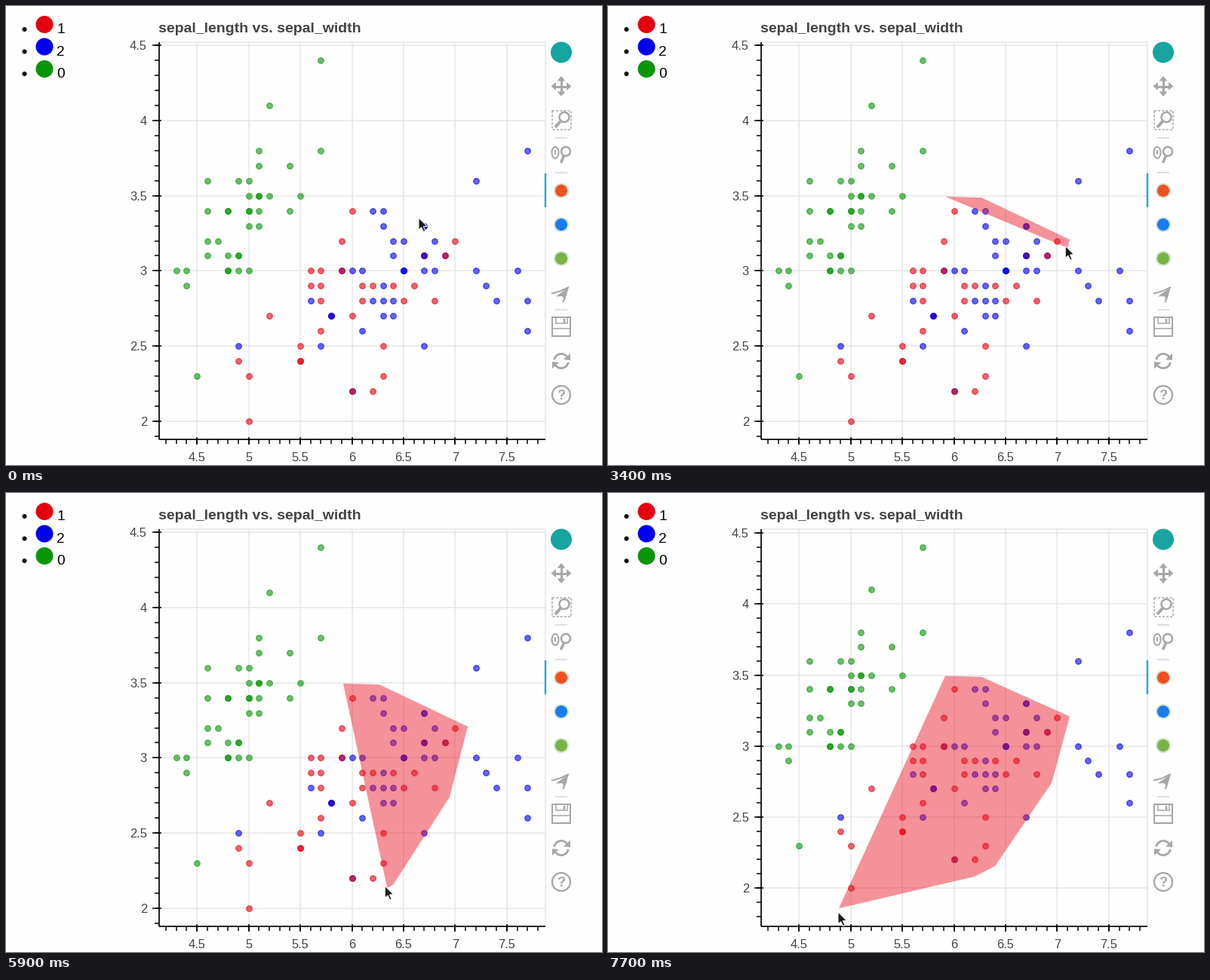
Animation of 790 by 609 pixels, one loop 8000 ms. Source, as a matplotlib script:

```python
import numpy as np
import matplotlib.pyplot as plt
from matplotlib.animation import FuncAnimation
from matplotlib.collections import LineCollection
from matplotlib.patches import Arc, Circle, Ellipse, Polygon, Rectangle

W, H, DPI = 790, 609, 100
PT = 72 / DPI                      # points per pixel
FRAMES, STEP = 80, 100
L, R, T, B = 202.5, 714.5, 48, 575  # plot box
TOP, LOW = 4.4, 2.0                # data limits in y
RED, BLUE, GREEN = "#e6000f", "#0000f0", "#089608"
INK, GRAY, PALE = "#444444", "#a6a6a6", "#e5e5e5"

# y value -> x values; a repeated x makes a darker dot
BLUES = {
    3.8: [7.7], 3.6: [7.2], 3.4: [6.2, 6.3], 3.3: [6.3, 6.7, 6.7],
    3.2: [6.4, 6.5, 6.8], 3.1: [6.4, 6.7, 6.9],
    3.0: [5.9, 6.0, 6.1, 6.5, 6.5, 6.5, 6.7, 6.8, 7.2, 7.6],
    2.9: [6.3, 7.3], 2.8: [5.6, 6.2, 6.3, 6.4, 7.4, 7.7],
    2.7: [6.3, 6.4], 2.6: [6.1, 7.7], 2.5: [4.9, 5.7, 6.7], 2.2: [6.0],
}
GREENS = {
    4.4: [5.7], 4.1: [5.2], 3.8: [5.1, 5.7], 3.7: [5.1, 5.4],
    3.6: [4.6, 4.9, 5.0], 3.5: [5.0, 5.1, 5.1, 5.2, 5.5],
    3.4: [4.6, 4.8, 4.8, 5.0, 5.0, 5.1, 5.4], 3.3: [5.0, 5.1],
    3.2: [4.6, 4.7], 3.1: [4.6, 4.8, 4.9, 4.9],
    3.0: [4.3, 4.4, 4.8, 4.8, 4.9, 5.0], 2.9: [4.4], 2.3: [4.5],
}
REDS = {
    3.4: [6.0], 3.2: [5.9, 7.0], 3.1: [6.7, 6.9], 3.0: [5.6, 5.7, 5.9],
    2.9: [5.6, 5.7, 6.1, 6.2, 6.4, 6.6], 2.8: [5.7, 6.1, 6.5, 6.8],
    2.7: [5.2, 5.8, 6.0], 2.6: [5.7], 2.5: [5.5, 6.3],
    2.4: [4.9, 5.5, 5.5], 2.3: [5.0, 6.3], 2.2: [6.0, 6.2], 2.0: [5.0],
}
BLUES_ON_TOP = {3.1: [6.7], 2.7: [5.8, 5.8]}

# pointer tip: step, x, y
POINTER = np.array([
    (1, 547, 281), (2, 505, 263), (3, 460, 251), (4, 444, 250.3),
    (10, 444, 250.3), (12, 504, 257), (13, 522, 261), (14, 522, 261),
    (15, 492, 251.4), (21, 492, 251.4), (22, 532, 263), (24, 577, 287),
    (27, 609, 307.2), (33, 609, 307.2), (41, 587, 397), (43, 585, 400.4),
    (45, 585, 400.4), (50, 527, 520), (52, 513, 526), (54, 510, 517.2),
    (57, 510, 517.2), (64, 483, 531.5), (66, 483, 531.5), (67, 417, 551),
    (68, 362, 550), (69, 324, 549), (70, 318, 548), (71, 333, 548),
    (73, 338, 550), (75, 318, 553), (77, 305, 556)])
# free corner once it stretches the y range: step, x pixel, y value
STRETCH = np.array([
    (67, 432, 1.992), (68, 385, 1.93), (69, 342, 1.86), (70, 318, 1.79),
    (71, 322, 1.741), (73, 336, 1.765), (75, 319, 1.825), (77, 306, 1.857)])
# placed corners: first step, x pixel, y value
CORNERS = [(0, 447, 3.494), (0, 495, 3.487), (34, 612, 3.208),
           (46, 588, 2.74), (58, 513, 2.155), (67, 486, 2.081)]


def px(v):
    return L + (np.asarray(v) - 4.13) / 3.74 * (R - L)


def y_scale(low):
    """Return bottom value, value-to-pixel and pixel-to-value maps."""
    pad = 0.05 * (TOP - low)
    top, bottom = TOP + pad, low - pad
    k = (B - T) / (top - bottom)
    return bottom, lambda v: T + (top - np.asarray(v)) * k, lambda p: top - (p - T) / k


def track(keys, i):
    return [np.interp(i, keys[:, 0], keys[:, c]) for c in (1, 2)]


def corners(i):
    """Polygon corners as (x pixel, y value)."""
    if i < 23:
        return []
    if i >= 67:
        free = track(STRETCH, i)
    else:
        x, y = track(POINTER, i)
        free = [x + 3, y_scale(LOW)[2](y + 2.6)]
    return [(x, y) for start, x, y in CORNERS if i >= start] + [free]


fig = plt.figure(figsize=(W / 100, H / 100), dpi=DPI, facecolor="#fefefe")
ax = fig.add_axes([0, 0, 1, 1])
ax.set(xlim=(0, W), ylim=(H, 0))
ax.axis("off")


def stroke(pts, width=2.0, color=GRAY, z=4, **kw):
    xs, ys = zip(*pts)
    return ax.plot(xs, ys, color=color, lw=width * PT, zorder=z,
                   solid_capstyle="butt", **kw)[0]


def shape(patch, z=4):
    patch.set_zorder(z)
    return ax.add_patch(patch)


def disc(x, y, r, color, edge="none", width=0):
    return shape(Circle((x, y), r, fc=color, ec=edge, lw=width * PT))


def ring(x, y, r, width=2.0):
    return disc(x, y, r, "none", GRAY, width)


def fill(pts, color=GRAY):
    return shape(Polygon(pts, fc=color, ec="none"))


def write(x, y, s, size, color=INK, **kw):
    return ax.text(x, y, s, fontsize=size * PT, color=color, va="baseline",
                   family="Liberation Sans", zorder=5, **kw)


def lines(color, width, z):
    return ax.add_collection(
        LineCollection([], colors=color, linewidths=width * PT, zorder=z))


def legend():
    rows = [("1", RED, 24.5), ("2", BLUE, 54), ("0", GREEN, 83.5)]
    for name, color, y in rows:
        disc(24.5, y + 6.5, 3, "black")
        disc(51, y, 11.5, color)
        write(67.5, y + 11.5, name, 19, "black")


def toolbar():
    x = 736
    stroke([(714.5, 222), (714.5, 267)], 2.5, "#30a8d8", 6)
    for y in (174.5, 221, 403):
        stroke([(728, y), (743.5, y)], 1.5, "#d4d4d4")
    disc(x, 61.5, 14, "#16a5a0")

    # pan
    y = 106.5
    stroke([(x - 9, y), (x + 9, y)], 3)
    stroke([(x, y - 9), (x, y + 9)], 3)
    for dx, dy in ((1, 0), (-1, 0), (0, 1), (0, -1)):
        tip = np.array([x + 13.5 * dx, y + 13.5 * dy])
        back = tip - 6.5 * np.array([dx, dy])
        side = 5.5 * np.array([-dy, dx])
        fill([tip, back + side, back - side])

    # box zoom
    shape(Rectangle((723.5, 139), 25, 25, fc="none", ec=GRAY,
                    lw=1.5 * PT, ls=(0, (2, 1.4))))
    ring(740, 147.5, 6.5, 2.5)
    stroke([(735.5, 152.5), (728, 161)], 4)

    # wheel zoom
    shape(Ellipse((728, 194.5), 9, 15, fc="none", ec=GRAY, lw=2 * PT))
    stroke([(728, 191), (728, 197)], 2)
    ring(742, 193, 6, 2.5)
    stroke([(739.5, 198.5), (735.5, 208)], 3.5)

    # drawing tools
    for y, color in ((245, "#f25022"), (290, "#187cf0"), (335, "#78b445")):
        disc(x, y, 9, color, "#d3e3cf", 2)

    # polygon edit
    stroke([(723, 381.5), (734, 378.5), (746, 373)], 2)
    stroke([(744, 374), (738.5, 393)], 2)
    fill([(746, 372.5), (729, 385.5), (737, 385), (741, 390)])

    # save
    shape(Rectangle((724, 413), 24, 25, fc="none", ec=GRAY, lw=2 * PT))
    shape(Rectangle((729, 413), 14.5, 8, fc="none", ec=GRAY, lw=1.5 * PT))
    stroke([(740, 414.5), (740, 419.5)], 2.5)
    stroke([(724, 428), (748, 428)], 1.5)

    # reset
    y = 471
    for a in (190, 10):
        shape(Arc((x, y), 19, 19, theta1=a, theta2=a + 135, ec=GRAY, lw=2.8 * PT))
    fill([(748, 461), (748, 470), (739, 469)])
    fill([(724, 481), (724, 472), (733, 473)])

    # help
    ring(x, 516, 12, 2.3)
    write(x, 522.5, "?", 18, GRAY, ha="center", weight="bold")


def fixed_axes():
    for v in np.arange(4.5, 7.6, 0.5):
        x = px(v)
        stroke([(x, T), (x, B)], 1.5, PALE, 1)
        stroke([(x, B - 3), (x, B + 7)], 1.5, "black")
        write(x, 604, f"{v:g}", 16.5, ha="center")
    for v in np.arange(42, 79) / 10:
        stroke([(px(v), B), (px(v), B + 6)], 1.5, "black")
    stroke([(L, T), (R, T), (R, B)], 1.5, PALE, 1)
    stroke([(L, T), (L, B)], 1.7, "black")
    stroke([(L, B), (R, B)], 1.7, "black")
    write(202, 35, "sepal_length vs. sepal_width", 19.5, weight="bold")


def dots(rows, color):
    pts = np.array([(x, y) for y, xs in rows.items() for x in xs])
    art = ax.scatter(px(pts[:, 0]), pts[:, 1], s=(7.6 * PT) ** 2, c=color,
                     edgecolors=color, linewidths=1.3 * PT, alpha=0.6, zorder=2)
    return art, pts


legend()
toolbar()
fixed_axes()
groups = [dots(BLUES, BLUE), dots(GREENS, GREEN), dots(REDS, RED),
          dots(BLUES_ON_TOP, BLUE)]

majors = np.arange(2, 4.6, 0.5)
grid = lines(PALE, 1.5, 1)
ticks = lines("black", 1.5, 4)
labels = [write(187, 0, f"{v:g}", 16.5, ha="right") for v in majors]
area = shape(Polygon(np.zeros((3, 2)), fc="#ea1a2c", ec="none", alpha=0.48), 3)
ARROW = np.array([(0, 0), (0, 16), (3.7, 12.7), (6.4, 18.6), (8.9, 17.5),
                  (6.3, 11.7), (11.2, 11.2)])
pointer = shape(Polygon(ARROW, fc="#1a1a1a", ec="white", lw=1 * PT), 10)


def update(i):
    poly = corners(i)
    low = min([LOW] + [y for _, y in poly])
    bottom, py, _ = y_scale(low)

    minors = np.arange(np.ceil(bottom * 10), 46) / 10
    grid.set_segments([[(L, y), (R, y)] for y in py(majors)])
    ticks.set_segments([[(L - 9, y), (L + 3, y)] for y in py(majors)]
                       + [[(L - 6, y), (L, y)] for y in py(minors)])
    for label, y in zip(labels, py(majors)):
        label.set_y(y + 6)
    for art, pts in groups:
        art.set_offsets(np.column_stack([px(pts[:, 0]), py(pts[:, 1])]))

    area.set_visible(bool(poly))
    if poly:
        area.set_xy([(x, py(y)) for x, y in poly])
    pointer.set_xy(ARROW + track(POINTER, i))
    return []


anim = FuncAnimation(fig, update, frames=FRAMES, interval=STEP,
                     repeat=True, repeat_delay=0, blit=False)
plt.show()
```
